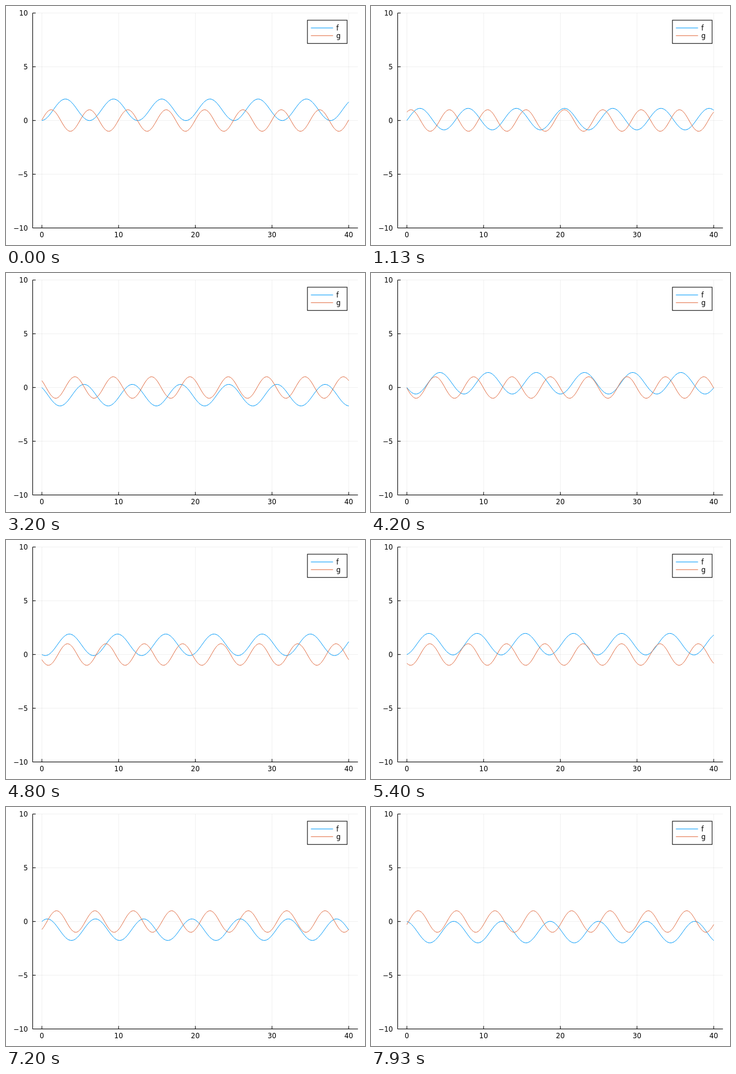
These frames come from a looping animation (600 by 400 pixels, 8000 ms). An HTML page:

```html
<!DOCTYPE html>
<html lang="en">
<head>
<meta charset="utf-8">
<title>Two waves</title>
<style>
  html, body { margin: 0; width: 100%; height: 100%; overflow: hidden; background: #fff; }
  svg { display: block; width: 600px; height: 400px; }
  text { font: 11.5px "DejaVu Sans", sans-serif; fill: #000; }
  path { fill: none; stroke-width: 1; }
  .grid { stroke: #000; stroke-opacity: .1; stroke-width: .6; }
  .axis { stroke: #000; }
  .f { stroke: #009afa; }
  .g { stroke: #e26f46; }
  .xlab { text-anchor: middle; }
  .ylab { text-anchor: end; }
</style>
</head>
<body>
<svg id="plot" viewBox="0 0 600 400">
  <path class="grid" id="grid"/>
  <path class="axis" id="axis"/>
  <path class="f" id="f"/>
  <path class="g" id="g"/>
  <rect x="503.8" y="23.8" width="66.3" height="38.9" fill="#fff" stroke="#000"/>
  <path class="f" d="M509.6 36.8H546.6"/>
  <path class="g" d="M509.6 49.7H546.6"/>
  <text x="552" y="41">f</text>
  <text x="552" y="54">g</text>
</svg>
<script>
  const LEFT = 44.6, RIGHT = 588.2, TOP = 11.8, BOTTOM = 371.5, TICK = 5;
  const LOOP = 8000, FPS = 15;
  const $ = id => document.getElementById(id);
  const px = x => LEFT + (x + 1.2) * (RIGHT - LEFT) / 42.4;
  const py = y => TOP + (10 - y) * (BOTTOM - TOP) / 20;

  function label(cls, x, y, value) {
    const el = document.createElementNS($("plot").namespaceURI, "text");
    el.setAttribute("class", cls);
    el.setAttribute("x", x);
    el.setAttribute("y", y);
    el.textContent = String(value).replace("-", "\u2212");
    $("plot").append(el);
  }

  function drawFrame() {
    let grid = "", axis = `M${LEFT} ${TOP}V${BOTTOM}H${RIGHT}`;
    for (let x = 0; x <= 40; x += 10) {
      grid += `M${px(x)} ${TOP}V${BOTTOM}`;
      axis += `M${px(x)} ${BOTTOM}v${-TICK}`;
      label("xlab", px(x), 387.2, x);
    }
    for (let y = -10; y <= 10; y += 5) {
      grid += `M${LEFT} ${py(y)}H${RIGHT}`;
      axis += `M${LEFT} ${py(y)}h${TICK}`;
      label("ylab", 36.7, py(y) + 4.2, y);
    }
    $("grid").setAttribute("d", grid);
    $("axis").setAttribute("d", axis);
  }

  function curve(id, fn) {
    let d = "";
    for (let i = 0; i <= 400; i++) {
      const x = i / 10;
      d += (i ? "L" : "M") + px(x).toFixed(2) + " " + py(fn(x)).toFixed(2);
    }
    $(id).setAttribute("d", d);
  }

  let shown = -1;
  function render() {
    // Steps begin on whole hundredths of a second.
    const hundredths = Math.floor(performance.now() % LOOP / 10);
    const step = Math.floor((hundredths + 0.4) * FPS / 100) + 1;
    if (step !== shown) {
      shown = step;
      const a = 0.08 * step, b = 0.05 * step;
      curve("f", x => Math.cos(a) - Math.cos(x + a));
      curve("g", x => Math.sin(2 * Math.PI * x / 5 + b));
    }
    requestAnimationFrame(render);
  }

  drawFrame();
  render();
</script>
</body>
</html>
```
